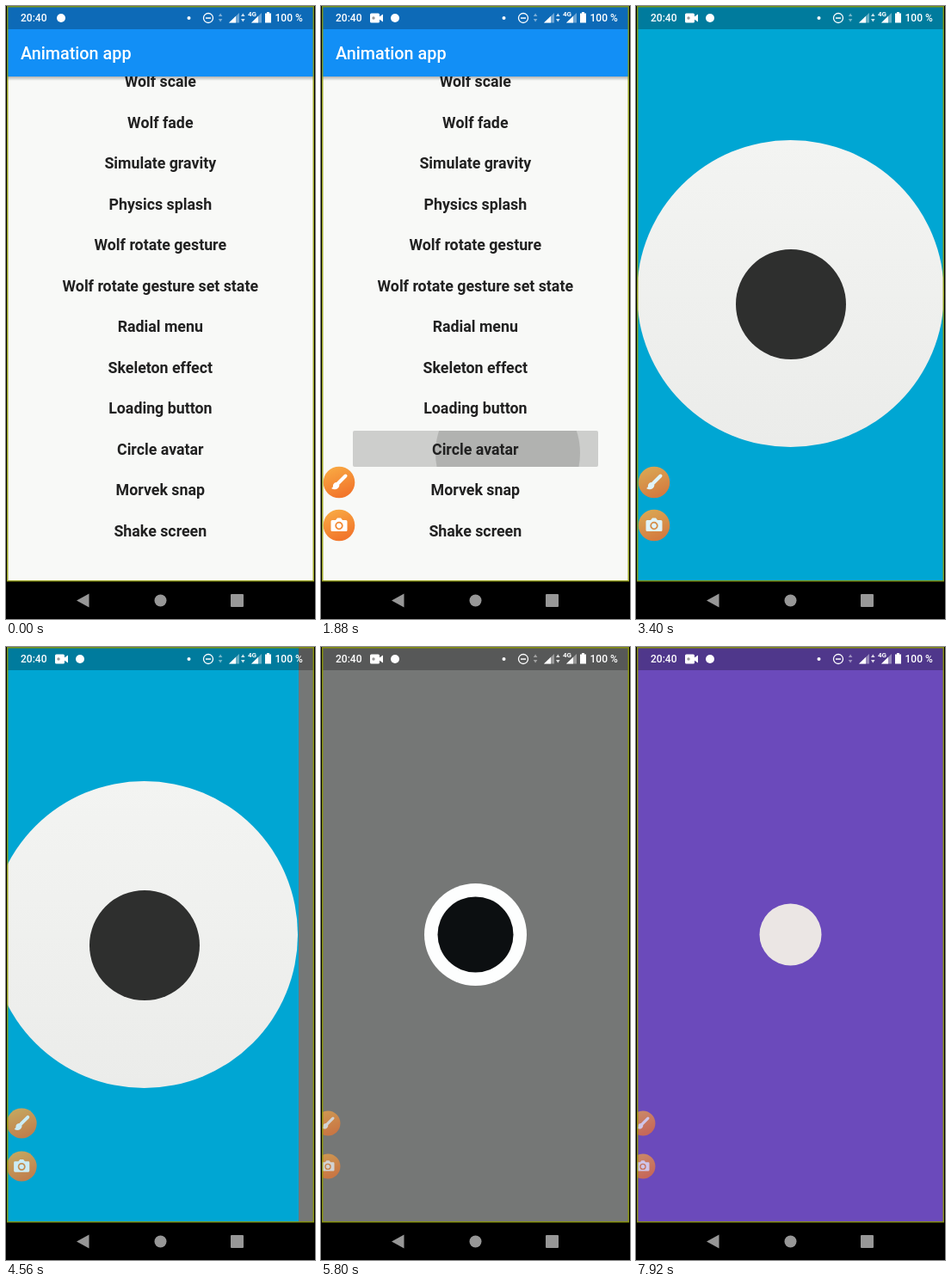
These frames come from a looping animation (359 px wide and 713 px high, 8 s). An HTML page:

```html
<!DOCTYPE html>
<html lang="en">
<head>
<meta charset="utf-8">
<title>Animation app</title>
<style>
  html, body { margin: 0; width: 100%; height: 100%; overflow: hidden; background: #000; }
  svg { display: block; width: 359px; height: 713px; font-family: Roboto, sans-serif; }
  .row { font-size: 17.8px; font-weight: 700; fill: #212121; text-anchor: middle; }
  .status { font-size: 12px; font-weight: 500; fill: #fff; }
</style>
</head>
<body>
<svg viewBox="0 0 359 713">
  <defs>
    <clipPath id="screen"><rect x="1" width="357" height="669"/></clipPath>
    <clipPath id="tile"><rect x="37" y="494" width="285" height="42" rx="2"/></clipPath>
    <linearGradient id="orange" x1="0" y1="0" x2=".4" y2="1">
      <stop offset="0" stop-color="#f9ae45"/><stop offset="1" stop-color="#f2772c"/>
    </linearGradient>
    <linearGradient id="shade" x2="0" y2="1">
      <stop offset="0" stop-opacity=".28"/><stop offset="1" stop-opacity="0"/>
    </linearGradient>
    <linearGradient id="paper" x2="0" y2="1">
      <stop offset="0" stop-color="#f3f4f2"/><stop offset="1" stop-color="#ebecea"/>
    </linearGradient>
    <g id="signal">
      <path d="M0 19.500L12 8v11.500z" opacity=".4"/>
      <path d="M0 19.500l8-7.700v7.700z"/>
    </g>
    <path id="traffic" d="M0 12l2.300-3.500 2.300 3.500zM0 15h4.600l-2.300 3.500z"/>
  </defs>

  <g clip-path="url(#screen)">
    <rect width="359" height="669" fill="#f8f9f7"/>
    <g id="ink" clip-path="url(#tile)">
      <rect x="37" y="494" width="285" height="42" fill="#cdcecc"/>
      <circle id="splash" cx="217" cy="520" fill="#b1b2b0"/>
    </g>
    <g id="list"></g>
    <rect y="82" width="359" height="5" fill="url(#shade)"/>
    <rect width="359" height="82" fill="#128ff6"/>
    <text x="17" y="62" font-size="19.8" font-weight="500" fill="#fff">Animation app</text>

    <g id="route"><g id="pages"></g></g>

    <rect width="359" height="27" fill="#000" opacity=".26"/>
    <g fill="#fff">
      <text class="status" x="17" y="18">20:40</text>
      <g id="recording">
        <rect x="57" y="8.5" width="11" height="11" rx="1.5"/>
        <path d="M67 13l5-3.5v9L67 15z"/>
        <circle cx="61" cy="14" r="1.7" fill="#555" opacity=".6"/>
      </g>
      <circle id="badge" cy="14" r="5"/>
      <circle cx="212.5" cy="14" r="2"/>
      <circle cx="235" cy="14" r="5.5" fill="none" stroke="#fff" stroke-width="1.3"/>
      <rect x="232" y="13.3" width="6" height="1.5"/>
      <use href="#traffic" x="246.8" opacity=".45"/>
      <use href="#signal" x="259"/>
      <use href="#traffic" x="273" opacity=".8"/>
      <text x="281" y="12" font-size="8" font-weight="700">4G</text>
      <use href="#signal" x="285"/>
      <path d="M303 7h3v1.5h2v11h-7v-11h2z"/>
      <text class="status" x="312.5" y="18">100 %</text>
    </g>

    <g id="brush">
      <circle r="18.3" fill="url(#orange)"/>
      <path d="M7.500 -7.500L-1 1" stroke="#fff" stroke-width="4" stroke-linecap="round"/>
      <path d="M-3 0c3 1 4 3 3 5c-2 4-6 4-9 2c2-1 2-2 2-4c1-2 2-3 4-3z" fill="#fff"/>
    </g>
    <g id="camera">
      <circle r="18.3" fill="url(#orange)"/>
      <path d="M-8 -6h4l2-2.5h4l2 2.5h4q1.5 0 1.5 1.5v10q0 1.5-1.5 1.5h-16q-1.5 0-1.5-1.5v-10q0-1.5 1.5-1.5z" fill="#fff"/>
      <circle cy=".5" r="3.8" fill="none" stroke="#f38a35" stroke-width="1.8"/>
    </g>
  </g>
  <rect x="1.75" y=".75" width="355.5" height="668" fill="none" stroke="#8d9900" stroke-opacity=".85" stroke-width="1.5"/>

  <g fill="#979797">
    <path d="M82 691.5L96.500 683.500v16z"/>
    <circle cx="179.5" cy="691.5" r="7"/>
    <rect x="261" y="684" width="15" height="15" rx="1"/>
  </g>
</svg>
<script>
const LOOP = 8000;
const TICK = 120, PHASE = 80;
const WIDTH = 359;
const $ = id => document.getElementById(id);
const set = (id, attrs) => {
  for (const name in attrs) $(id).setAttribute(name, attrs[name]);
};

const labels = ['Wolf scale', 'Wolf fade', 'Simulate gravity', 'Physics splash',
  'Wolf rotate gesture', 'Wolf rotate gesture set state', 'Radial menu', 'Skeleton effect',
  'Loading button', 'Circle avatar', 'Morvek snap', 'Shake screen'];
$('list').innerHTML = labels.map((label, i) =>
  `<text class="row" x="179.3" y="${94 + i * 47.52}">${label}</text>`).join('');

const avatarPage = (index, color, radius, fill, emblem = '') =>
  `<g transform="translate(${index * WIDTH} 0)">
    <rect width="${WIDTH + 1}" height="669" fill="${color}"/>
    <circle cx="179.5" cy="334.5" r="${radius}" fill="${fill}"/>${emblem}
  </g>`;
$('pages').innerHTML =
  avatarPage(0, '#00a6d3', 178.5, 'url(#paper)', '<circle cx="180" cy="347" r="64" fill="#2e2f2e"/>') +
  avatarPage(1, '#757776', 59.5, '#fdfefe', '<circle cx="179.5" cy="334.5" r="44" fill="#0c0f11"/>') +
  avatarPage(2, '#6b4abb', 36, '#ebe6e4');

const linear = u => u;
const easeOut = u => 1 - (1 - u) ** 3;
const easeInOut = u => u * u * (3 - 2 * u);
const mix = (a, b, u) => a + (b - a) * u;

function draw(time) {
  const t = Math.max(0, Math.floor((time - PHASE) / TICK) * TICK + PHASE);
  const progress = (from, duration, ease) =>
    ease(Math.min(1, Math.max(0, (t - from) / duration)));

  const enter = progress(40, 900, easeOut);
  const press = progress(1200, 300, linear);
  const ripple = progress(1320, 1200, linear);
  const open = progress(2480, 720, easeOut);
  const park = progress(4400, 400, easeInOut);
  const firstSwipe = progress(4400, 860, easeInOut);
  const secondSwipe = progress(7040, 453, easeInOut);
  const recording = t >= 400;

  set('recording', { opacity: recording ? 1 : 0 });
  set('badge', { cx: recording ? 86 : 64 });
  set('ink', { opacity: press });
  set('splash', { r: 180 * ripple });
  set('route', { opacity: open, transform: `translate(0 ${mix(170, 0, open)})` });
  set('pages', { transform: `translate(${-WIDTH * (firstSwipe + secondSwipe)} 0)` });

  // The floating tools slide in, then dim and tuck into the edge.
  const x = mix(mix(-22, 21, enter), 8, park);
  const opacity = 1 - .12 * open - .2 * park - .25 * Math.sin(Math.PI * firstSwipe);
  for (const [id, y] of [['brush', 554], ['camera', 604]]) {
    set(id, { opacity, transform: `translate(${x} ${y}) scale(${mix(1, .79, park)})` });
  }
}

const start = performance.now();
function frame(now) {
  draw(Math.max(0, now - start) % LOOP);
  requestAnimationFrame(frame);
}
draw(0);
requestAnimationFrame(frame);
</script>
</body>
</html>
```
